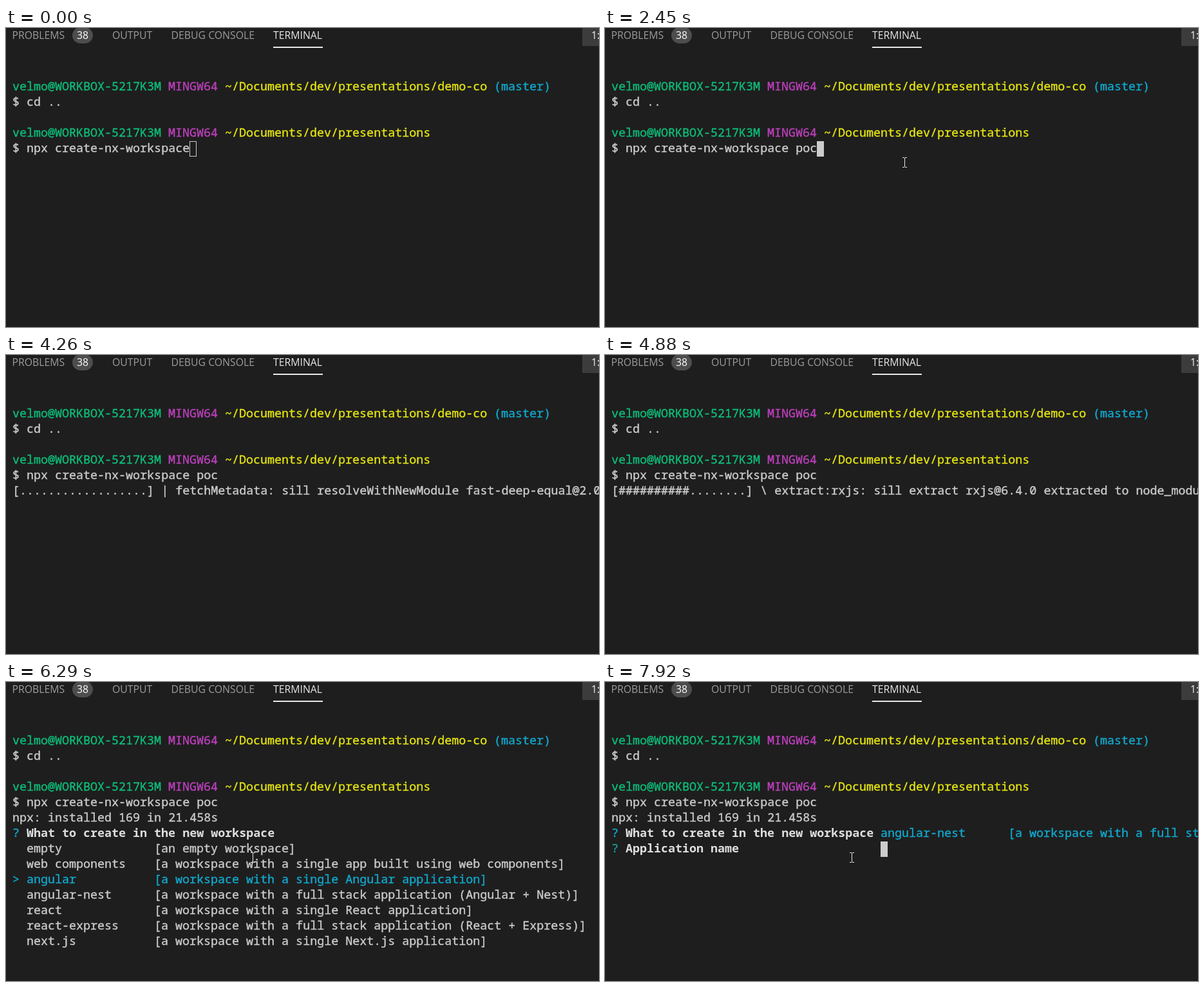
These frames come from a looping animation (921 by 465 pixels, 8000 ms). An HTML page:

```html
<!DOCTYPE html>
<html lang="en">
<head>
<meta charset="utf-8">
<title>Workspace terminal</title>
<style>
  html, body { margin: 0; width: 100%; height: 100%; overflow: hidden; background: #1e1e1e; }
  svg { display: block; width: 921px; height: 465px; }
  text { white-space: pre; }
  .ui { font: 15.8px "Open Sans", "Noto Sans", sans-serif; }
  .term { font: 18.35px "Noto Sans Mono", "DejaVu Sans Mono", monospace; stroke-width: .4px; }
  .bold { font-weight: 700; stroke: none; }
</style>
</head>
<body>
<svg viewBox="0 0 921 465">
  <rect width="921" height="465" fill="#1e1e1e"/>
  <g class="ui" fill="#9c9c9c">
    <text x="9.5" y="17">PROBLEMS</text>
    <rect x="103" y="-1" width="32" height="25" rx="12.5" fill="#4d4d4d"/>
    <text x="119" y="17" text-anchor="middle" fill="#fff">38</text>
    <text x="165" y="17">OUTPUT</text>
    <text x="256.5" y="17">DEBUG CONSOLE</text>
    <text x="415" y="17" fill="#e7e7e7">TERMINAL</text>
    <rect x="415" y="29" width="77" height="2" fill="#e7e7e7"/>
    <rect x="895" y="0" width="26" height="28" fill="#3c3c3c"/>
    <text x="909" y="17" fill="#f0f0f0">1:</text>
  </g>
  <g class="term" id="history"></g>
  <g class="term" id="live"></g>
</svg>
<script>
const LOOP = 8000, LEFT = 10, TOP = 80, CELL = 11, LINE = 24;
const FG = '#cccccc', CYAN = '#11a8cd', GREEN = '#0dbc79', PURPLE = '#bc3fbc',
      YELLOW = '#e5e510', WHITE = '#dedede', TEAL = '#1b9a97';

const colX = c => LEFT + c * CELL;
const rowY = r => TOP + r * LINE;

// Regular text gets a hairline stroke in its own colour for a sturdier weight.
function run(row, col, str, color = FG, bold = false) {
  const look = bold ? 'class="bold"' : `stroke="${color}"`;
  return `<text x="${colX(col)}" y="${rowY(row) + 17}" fill="${color}" ${look}>${str}</text>`;
}

function block(row, col, hollow) {
  const x = colX(col), y = rowY(row);
  return hollow
    ? `<rect x="${x + .5}" y="${y + .5}" width="10" height="23" fill="none" stroke="${FG}" stroke-width="1"/>`
    : `<rect x="${x}" y="${y}" width="11" height="24" fill="${FG}"/>`;
}

function ibeam(x, y) {
  return `<path fill="#e8e8e8" d="M${x} ${y}h3v1h-3zm4 0h3v1h-3zm-1 1h1v14h-1zm-3 14h3v1h-3zm4 0h3v1h-3z"/>`;
}

function prompt(row, path, branch = '') {
  return run(row, 0, 'velmo@WORKBOX-5217K3M', GREEN) + run(row, 22, 'MINGW64', PURPLE) +
    run(row, 30, path, YELLOW) + run(row, 31 + path.length, branch, CYAN);
}

document.getElementById('history').innerHTML =
  prompt(0, '~/Documents/dev/presentations/demo-co', '(master)') +
  run(1, 0, '$ cd ..') +
  prompt(3, '~/Documents/dev/presentations');

const app = s => `[a workspace with a ${s}]`;
const options = [
  ['empty', '[an empty workspace]'],
  ['web components', app('single app built using web components')],
  ['angular', app('single Angular application')],
  ['angular-nest', app('full stack application (Angular + Nest)')],
  ['react', app('single React application')],
  ['react-express', app('full stack application (React + Express)')],
  ['next.js', app('single Next.js application')]
];

// Each track lists [start, value]; a value holds until the next start.
const at = (track, t) => track.reduce((v, [start, next]) => t >= start ? next : v, null);

const mouse = [
  [200, [482, 236]], [420, [464, 207]], [620, [462, 200]], [820, [462, 201]],
  [3660, [559, 278]], [3860, [795, 443]], [4060, null],
  [4480, [846, 455]], [4680, null], [5280, [380, 265]]
];
const typed = [[0, ''], [1630, ' '], [2030, ' po'], [2450, ' poc']];
const picked = [[5280, 0], [5880, 1], [6290, 2], [6890, 3]];

const bar = (done, spin, task) => `[${'#'.repeat(done)}${'.'.repeat(18 - done)}] ${spin} ${task}`;
const fetching = (spin, pkg) => bar(0, spin, `fetchMetadata: sill resolveWithNewModule ${pkg} checking`);
const progress = [
  [4060, fetching('\\', 'json-schema-traverse@0.4.1')],
  [4260, fetching('|', 'fast-deep-equal@2.0.1')],
  [4480, fetching('-', 'punycode@2.1.1')],
  [4680, fetching('-', 'uri-js@4.2.2')],
  [4880, bar(10, '\\', 'extract:rxjs: sill extract rxjs@6.4.0 extracted to node_modules')]
];

const question = run(6, 0, '?', CYAN) + run(6, 2, 'What to create in the new workspace', WHITE, true);

function menu(pick) {
  const hint = pick === 0 ? run(6, 38, '(Use arrow keys)') : '';
  return question + hint + options.map(([name, info], i) => {
    const color = i === pick ? CYAN : FG, row = 7 + i;
    return (i === pick ? run(row, 0, '&gt;', color) : '') + run(row, 2, name, color) + run(row, 20, info, color);
  }).join('');
}

function answered() {
  const [name, info] = options[3];
  return question + run(6, 38, name, CYAN) + run(6, 56, info, CYAN) +
    run(7, 0, '?', TEAL) + run(7, 2, 'Application name', WHITE, true) + block(7, 38);
}

function scene(t) {
  const command = '$ npx create-nx-workspace' + at(typed, t);
  let out = run(4, 0, command);
  if (t < 3050) out += block(4, command.length, t < 820);
  else if (t < 4060) out += block(5, 0);
  else if (t < 5280) out += run(5, 0, at(progress, t));
  else out += run(5, 0, 'npx: installed 169 in 21.458s') + (t < 7920 ? menu(at(picked, t)) : answered());

  if (t >= 820 && t < 1010) out += '<circle cx="463" cy="208" r="15" fill="#ff0" fill-opacity=".47"/>';
  const pos = at(mouse, t);
  return pos ? out + ibeam(...pos) : out;
}

const live = document.getElementById('live');
let shown = '';
function draw(now) {
  const next = scene(now % LOOP);
  if (next !== shown) live.innerHTML = shown = next;
  requestAnimationFrame(draw);
}
draw(performance.now());
</script>
</body>
</html>
```
